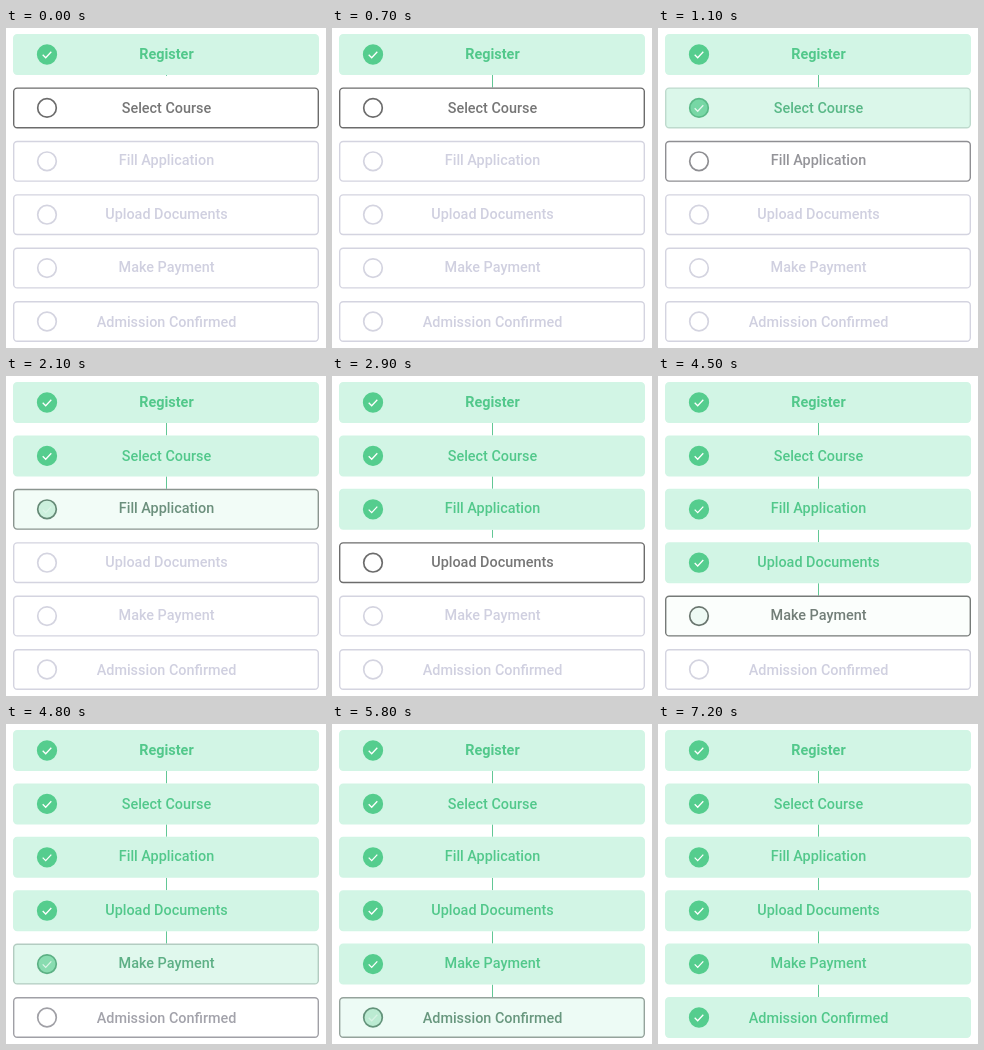
An HTML page that plays this animation: 320 by 320 pixels, repeating every 8 s.

```html
<!DOCTYPE html>
<html lang="en">
<head>
<meta charset="utf-8">
<title>Admission steps</title>
<style>
  html, body { margin: 0; width: 100%; height: 100%; overflow: hidden; background: #fff; }
  svg { display: block; width: 100vw; height: 100vh; }
  text { font: 500 14.4px Roboto, sans-serif; text-anchor: middle; }
</style>
</head>
<body>
<svg id="stage" viewBox="0 0 320 320"></svg>
<script>
const LOOP = 8000, TICK = 100, PITCH = 53.4;
const FILL_TIME = 500, WAKE_TIME = 300, LINE_TIME = 700;

// label, baseline, moment at which the step is complete
const steps = [
  ['Register', 30.5, -50],
  ['Select Course', 85, 1200],
  ['Fill Application', 137, 2450],
  ['Upload Documents', 191, 3550],
  ['Make Payment', 244, 4950],
  ['Admission Confirmed', 299, 6100]
];

const IDLE = { edge: [212, 212, 224], text: [208, 208, 224], box: [255, 255, 255], disc: [255, 255, 255] };
const ACTIVE = { edge: [108, 108, 108], text: [118, 118, 118], box: [255, 255, 255], disc: [255, 255, 255] };
const DONE = { edge: [210, 245, 229], text: [82, 200, 139], box: [210, 245, 229], disc: [85, 205, 142] };

const stage = document.getElementById('stage');
const clamp = v => Math.max(0, Math.min(1, v));
const mix = (a, b, k) => a.map((v, i) => v + (b[i] - v) * k);
const rgb = c => `rgb(${c.map(Math.round)})`;

function set(el, attrs) {
  for (const name in attrs) el.setAttribute(name, attrs[name]);
  return el;
}

function add(tag, attrs) {
  return stage.appendChild(set(document.createElementNS('http://www.w3.org/2000/svg', tag), attrs));
}

const rows = steps.map(([label, baseline, done], i) => {
  const top = 6 + i * PITCH, middle = top + 20.5;
  const row = {
    done,
    wake: i ? steps[i - 1][2] : -LOOP,
    line: add('rect', { x: 160, y: top + 41, width: 1, height: 0, fill: '#62c795' }),
    box: add('rect', { x: 7.7, y: top + 0.7, width: 304.6, height: 39.6, rx: 3.5, 'stroke-width': 1.4 }),
    disc: add('circle', { cx: 41, cy: middle, r: 9.3, 'stroke-width': 1.7 }),
    check: add('path', {
      d: `M36.7 ${middle + 0.3}l3 3 5.6-6`, fill: 'none', stroke: '#fff', 'stroke-width': 1.3
    }),
    text: add('text', { x: 160.5, y: baseline })
  };
  row.text.textContent = label;
  if (i === 0) row.text.style.fontWeight = 700;
  return row;
});

function draw(t) {
  rows.forEach((row, i) => {
    const awake = clamp((t - row.wake) / WAKE_TIME + 1);
    const filled = clamp((t - row.done) / FILL_TIME + 1);
    const color = part => mix(mix(IDLE[part], ACTIVE[part], awake), DONE[part], filled);
    const ring = mix(mix(IDLE.edge, ACTIVE.edge, awake), DONE.disc, filled);

    set(row.box, { fill: rgb(color('box')), stroke: rgb(color('edge')) });
    set(row.disc, { fill: rgb(color('disc')), stroke: rgb(ring) });
    set(row.check, { opacity: filled });
    set(row.text, { fill: rgb(color('text')) });
    if (i < rows.length - 1) {
      set(row.line, { height: (PITCH - 41) * clamp((t - row.done) / LINE_TIME) });
    }
  });
}

const start = performance.now();
function frame() {
  const t = (performance.now() - start) % LOOP;
  draw(Math.floor(t / TICK) * TICK);
  requestAnimationFrame(frame);
}
frame();
</script>
</body>
</html>
```
